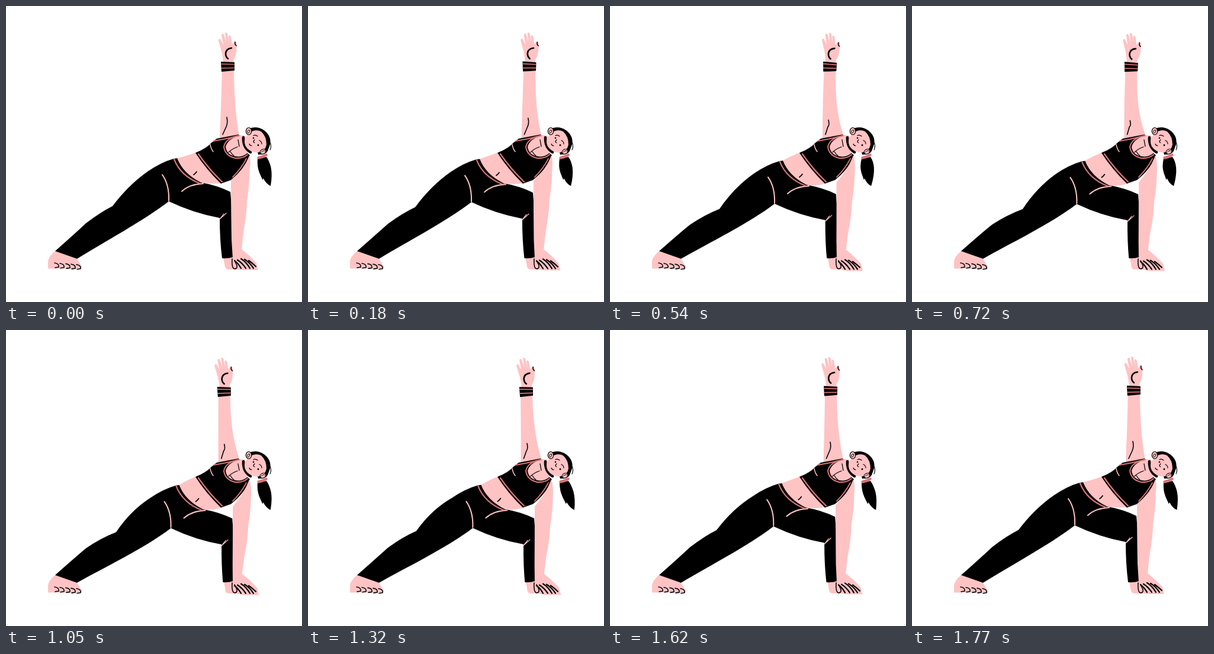
These frames come from a looping animation (500 px wide and 500 px high, 1.8 s). An HTML page:

```html
<!DOCTYPE html>
<html lang="en">
<head>
<meta charset="utf-8">
<title>Side stretch</title>
<style>
html, body { margin: 0; width: 100%; height: 100%; overflow: hidden; background: #fff; }
svg { display: block; width: 100vw; height: 100vh; }
</style>
</head>
<body>
<svg id="stage" viewBox="0 0 500 500" stroke-linecap="round" stroke-linejoin="round"></svg>
<script>
const LOOP = 1800, SKIN = '#ffc3c4', TRIM = '#d87477', INK = '#000';
const KEYS = [0, 390, 720, 1050, 1320, 1620];
const stage = document.getElementById('stage');

// Smooth cyclic curve through one value per key time.
function track(t, values) {
  const n = KEYS.length;
  const wrap = i => (i + n) % n;
  const time = i => KEYS[wrap(i)] + LOOP * Math.floor(i / n);
  const value = i => values[wrap(i)];
  const slope = i => (value(i + 1) - value(i - 1)) / (time(i + 1) - time(i - 1));
  let i = n - 1;
  while (KEYS[i] > t) i--;
  const span = time(i + 1) - time(i), u = (t - time(i)) / span, v = 1 - u;
  return v * v * (1 + 2 * u) * value(i) + u * u * (3 - 2 * u) * value(i + 1)
    + span * u * v * (v * slope(i) - u * slope(i + 1));
}

const fill = (d, color) => `<path d="${d}" fill="${color}"/>`;
const line = (d, color = INK, width = 1.5) =>
  `<path d="${d}" fill="none" stroke="${color}" stroke-width="${width}"/>`;

function backFoot() {
  const toes = [82, 91, 101, 110, 119].map((x, i) => `M${x} ${434 + i * .7}q8 1 7 7l-6 1`).join('');
  return fill('M84 413Q72 423 71 431L71 443.500L126 443.500Q130 441 126 437L118 424Z', SKIN)
    + line(toes, INK, 1.6);
}

function legs(p, knee) {
  const [kx, ky] = knee;
  const outline = `M83 414Q118 383 135 ${367 + ky * .5}Q160 ${348 + ky} ${180 + kx} ${338 + ky}`
    + `Q${207 + kx * .5} ${302 + ky} ${p(240, 279)}Q${p(262, 264)} ${p(283, 258)}`
    + `L${p(290, 257)}L${p(329, 298)}Q${p(357, 303)} ${p(379, 314, .9)}`
    + `L${p(383, 360, .8)}L384 424Q375 427 ${p(365, 426, .4, 0)}`
    + `Q${p(361, 395, .8)} ${p(361, 358, .9)}Q${p(317, 350)} ${p(275, 330)}`
    + `C${p(232, 363)} ${p(165, 399, .4)} 120 427Z`;
  return fill(`M${p(367, 425, .3, 0)}L${p(369, 436, .3, 0)}Q370 445 376 445L390 445L386 424Z`, SKIN)
    + fill(outline, INK)
    + line(`M${p(264, 285)}Q${p(276, 302)} ${p(275, 329)}`, SKIN, 2)
    + line(`M${p(297, 313)}Q${p(310, 301)} ${p(333, 300)}`, SKIN, 2)
    + line(`M${p(372, 350, .9)}L${p(361, 360, .9)}L${p(368, 351, .9)}`, SKIN, 1.2);
}

function torso(p) {
  const edge = `M${p(289, 257)}Q${p(299, 283)} ${p(329, 298)}`;
  return fill(`${edge}Q${p(348, 301)} 366 299L325 246Q306 253 ${p(289, 257)}Z`, SKIN)
    + line(`M${p(284, 259)}Q${p(295, 287)} ${p(327, 299.5)}`, TRIM, 2.2)
    + line(`M${p(317, 285)}Q${p(320, 283)} ${p(322, 280)}`, INK, 1.8)
    + fill('M320 248Q338 241 347 231L356 224L393 217L401 243L412 252Q404 275 380 294L363 300Q338 276 320 248Z', INK)
    + line('M325 250Q343 276 365 297', TRIM, 2.2)
    + line('M351 228Q372 225 393 219', TRIM, 2)
    + line('M345 234Q346 241 350 246', SKIN, 1.6)
    + fill('M395 218Q374 225 371 238Q373 252 388 254Q399 256 407 249L412 245L404 219Z', SKIN)
    + line('M394 219Q371 223 368 238Q370 253 387 257Q400 258 408 251', TRIM, 2)
    + line('M376 247Q382 241 391 238M379 246Q382 251 385 253M392 226L394 237', INK, 1.3);
}

function raisedArm(elbow, hand) {
  const { x, y, turn } = hand;
  const sx = elbow * .45, ex = elbow * .85;
  const arm = `M${365 + x} ${108 + y}Q${363.5 + elbow} 165 ${361 + sx} 225L395 222L393 214`
    + `Q${385.5 + elbow * 1.4} 172 ${385 + x} ${108 + y}Z`;
  const palm = 'M367 95Q366 82 363 73L359 59Q359 54 362 56L367 65L364 49Q365 45 368 48L372 62L370 46'
    + 'Q371 43 374 47L377 62L376 51Q378 47 380 52L382 65L386 59Q389 58 390 65L389 77Q388 86 384 91L385 96Z';
  return fill(arm, SKIN)
    + line(`M${373 + ex} ${188 - elbow}Q${375 + ex} ${197 - elbow} ${372 + ex} 204L${366 + sx} 217`, INK, 1.6)
    + `<g transform="translate(${x} ${y}) rotate(${turn} 375 103)">`
    + fill(palm, SKIN)
    + line('M381 71Q372 72 371 80Q371 86 375 89', INK, 2.6)
    + line('M387 61Q386 65 389 67', INK, 1.6)
    + fill('M363 94L386 95L386 109Q375 110 364 111Z', INK)
    + line('M364 98L385 98.500M364 105L385 104.500', TRIM, 1.7)
    + '</g>';
}

function head(sway) {
  const q = (x, y, w) => `${x + sway * w} ${y}`;
  const tail = `M425 258Q${q(423, 271, .4)} ${q(427, 282, .6)}L${q(432, 294, .8)}L${q(433, 291, .8)}`
    + `Q${q(438, 301, 1)} ${q(445, 304, 1)}Q${q(449, 286, .6)} ${q(447, 273, .3)}Q445 262 440 255Z`;
  return fill(tail, INK)
    + line('M401 222Q400 239 413 247', INK, 4.5)
    + fill('M411 207Q424 202 436 210Q449 220 446 234L442 245Q439 251 426 251L417 216Z', INK)
    + fill('M411 214Q422 207 431 212Q440 220 440 234Q439 239 436 243Q426 250 416 246Q402 240 403 227Q406 218 411 214Z', SKIN)
    + `<g fill="${SKIN}" stroke="#000" stroke-width="1.2"><ellipse cx="410" cy="211.500" rx="4.700" ry="6"/>`
    + '<ellipse cx="434" cy="246" rx="5" ry="3.800" transform="rotate(-25 434 246)"/></g>'
    + line('M408 214Q407 208 412 210Q412 214 409 215M431 247Q435 243 437 245', INK, 1)
    + line('M446 230Q449 237 446 243', INK, 1.2)
    + line('M418 219Q421 217 425 220M428 227Q432 229 432 233M420 226Q416 230 420 231M411 233Q412 236 415 236', INK, 1.2)
    + '<circle cx="418" cy="223" r="1.300"/><circle cx="426" cy="235" r="1.500"/>'
    + line('M426.500 256.500Q434 255 439.500 251.500', TRIM, 4.5);
}

function supportArm(p, h) {
  const fingers = [[386, 430, 397], [391, 429, 405], [397, 427, 412], [403, 428, 418], [410, 430, 422]]
    .map(([x, y, end]) => `M${x} ${y}Q${(x + end) / 2 + 1} ${y + 5} ${end} ${443 - (end > 420) * 3}`).join('');
  const shape = `M411 252Q414 260 ${p(412, 272, .6)}Q${p(411, 305, .7)} ${p(407, 328, .6)}`
    + `Q${p(407, 350, .5)} ${p(401, 382, .4)}L${p(398, 411, .2)}`
    + `Q411 421 ${p(423, 434, .3)}L${p(426, 446, .35)}L${p(399, 446, .35)}L388 445`
    + `Q382 438 383 426L${p(381, 395, .5)}Q${p(380, 340, .9)} ${p(380, 294, .9)}Q402 276 410 255Z`;
  return fill(shape, SKIN)
    + line('M383 289Q397 275 406 258', TRIM, 1.8)
    + `<g transform="translate(0 ${h * 1.8})">` + line(fingers, INK, 2.2) + '</g>'
    + line('M382 427Q381 443 386 444Q391 444 390 438L386 430', INK, 1.6);
}

function draw(now) {
  const t = now % LOOP;
  const h = track(t, [0, .7, .95, 1, .95, .35]);
  // Point carried along by the hips, by weight w.
  const p = (x, y, w = 1, wy = w) => `${x + 3.5 * h * w} ${y + 4.8 * h * wy}`;
  const knee = [track(t, [0, 3, 7, 6, 3, 0]), track(t, [0, 4, 5, 3.5, 1.5, 0])];
  const hand = {
    x: track(t, [0, -2.3, -4.5, -6.2, -6, -2]),
    y: track(t, [0, 0, .8, 2, 2, .7]),
    turn: track(t, [0, 3, 2.5, -.5, -1, .5])
  };
  const elbow = track(t, [0, -3.5, -5.5, -5, -3.5, -1.2]);
  const sway = .7 - 4.5 * Math.sin(2 * Math.PI * (t - 80) / LOOP);
  stage.innerHTML = backFoot() + legs(p, knee) + raisedArm(elbow, hand) + torso(p)
    + supportArm(p, h) + head(sway);
}

const start = performance.now();
function tick() {
  draw(performance.now() - start);
  requestAnimationFrame(tick);
}
tick();
</script>
</body>
</html>
```
